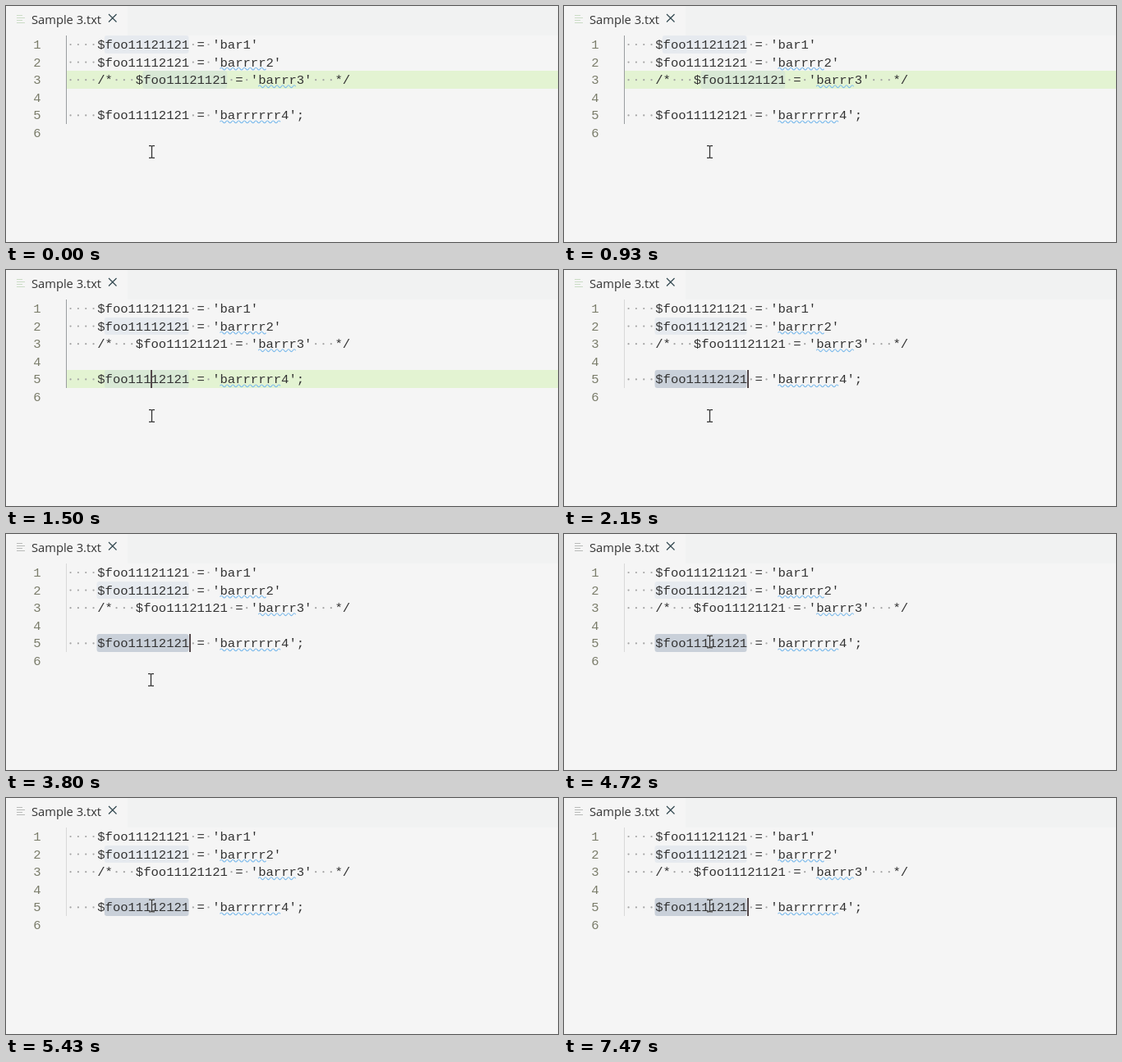
These frames come from a looping animation (672 by 288 pixels, 7.55 s). An HTML page:

```html
<!DOCTYPE html>
<html lang="en">
<head>
<meta charset="utf-8">
<title>Editor selection</title>
<style>
  html, body { margin: 0; height: 100%; overflow: hidden; background: #f5f5f5; }
  svg { display: block; width: 672px; height: 288px; }
  .code { font: 15.55px "Liberation Mono", "Noto Sans Mono", monospace; fill: #333; }
  .number { fill: #7b7d6b; text-anchor: end; }
  .title { font: 14.7px "Open Sans", "Noto Sans", sans-serif; fill: #333; }
  .dot { fill: #a4a4a4; }
  .wave { fill: none; stroke: #7fbcec; stroke-width: 1.1; }
  .soft { fill: rgba(185, 197, 218, .25); }
  .picked { fill: #c9d0d9; }
  .halo { fill: none; stroke: #fff; stroke-width: 2.2; opacity: .6; }
  .beam { fill: none; stroke: #303030; stroke-width: 1.3; }
</style>
</head>
<body>
<svg viewBox="0 0 672 288">
  <rect width="672" height="288" fill="#f5f5f5"/>
  <rect x="148" width="524" height="36" fill="#f1f2f2"/>
  <path id="icon" d="M13 11.5h7M13 14.5h10M13 17.5h7M13 20.5h10" stroke-width="1.2"/>
  <text class="title" x="31" y="22">Sample 3.txt</text>
  <path d="M125 10l9.5 9.5M134.5 10l-9.5 9.5" stroke="#31474f" stroke-width="1.2"/>
  <rect id="active" x="73" width="599" fill="#e3f3d2"/>
  <g id="marks"></g>
  <rect id="guide" x="73" y="36" width="1" height="108"/>
  <g id="text"></g>
  <rect id="caret" width="2" fill="#54494b"/>
  <g id="mouse"></g>
</svg>
<script>
const LOOP = 7550, BLINK = 515;
const LEFT = 73.9, CELL = 9.33, TOP = 36, PITCH = 21.6;
const lines = [
  "    $foo11121121 = 'bar1'",
  "    $foo11112121 = 'barrrr2'",
  "    /*   $foo11121121 = 'barrr3'   */",
  "",
  "    $foo11112121 = 'barrrrrr4';",
  ""
];

// The caret is lit at `lit` and toggles from there; `word` marks each of its occurrences.
const scenes = [
  { from: 0, row: 2, col: 11, lit: 400, word: "foo11121121" },
  { from: 1100, row: 3, col: 0 },
  { from: 1270, row: 4, col: 11 },
  { from: 1500, row: 4, col: 11, lit: 1270, word: "foo11112121" },
  { from: 2150, row: 4, col: 16, word: "$foo11112121", selected: true },
  { from: 3240, row: 4, col: 16, lit: 3800, word: "$foo11112121", selected: true },
  { from: 4780, row: 4, col: 11 },
  { from: 4950, row: 4, col: 16, lit: 4915, word: "foo11112121", selected: true, alone: true },
  { from: 5030, row: 4, col: 16, lit: 4915, word: "foo11112121", selected: true },
  { from: 6440, row: 4, col: 16, word: "$foo11112121", selected: true }
];

const $ = id => document.getElementById(id);
const colX = col => LEFT + col * CELL;
const rowBox = row => {
  const y = Math.round(TOP + row * PITCH);
  return { y, height: Math.round(TOP + (row + 1) * PITCH) - y };
};

function set(node, attrs) {
  for (const name in attrs) node.setAttribute(name, attrs[name]);
}

function add(parent, tag, attrs, content = "") {
  const node = document.createElementNS("http://www.w3.org/2000/svg", tag);
  set(node, attrs);
  node.textContent = content;
  return parent.appendChild(node);
}

function show(node, visible) {
  node.style.visibility = visible ? "visible" : "hidden";
}

function drawText() {
  const text = $("text");
  lines.forEach((line, row) => {
    const baseline = TOP + row * PITCH + 16;
    add(text, "text", { class: "code number", x: 42.5, y: baseline }, row + 1);
    for (const { 0: word, index } of line.matchAll(/\S+/g))
      add(text, "text", { class: "code", x: colX(index), y: baseline }, word);
    for (const { index } of line.matchAll(/ /g))
      add(text, "circle", { class: "dot", cx: colX(index + 0.5), cy: baseline - 5, r: 1.1 });
    for (const { 0: typo, index } of line.matchAll(/barr+/g)) {
      const half = 3.5, count = Math.round(typo.length * CELL / half);
      const d = `M${colX(index)} ${baseline + 3}q${half / 2}-2.8 ${half} 0` + `t${half} 0`.repeat(count - 1);
      add(text, "path", { class: "wave", d });
    }
  });
}

function drawMouse() {
  const half = "M-3.5-7.4H-1.2Q0-7.4 0-6.2Q0-7.4 1.2-7.4H3.5";
  const d = half + "M0-6.4V6.4M-3.5 7.4H-1.2Q0 7.4 0 6.2Q0 7.4 1.2 7.4H3.5";
  for (const kind of ["halo", "beam"]) add($("mouse"), "path", { class: kind, d });
}

function drawMarks({ row, word, selected, alone }) {
  $("marks").replaceChildren();
  if (!word) return;
  lines.forEach((line, i) => {
    const start = line.indexOf(word), own = i === row;
    if (start < 0 || (alone && !own)) return;
    add($("marks"), "rect", {
      class: selected && own ? "picked" : "soft",
      x: colX(start) - 0.7, width: word.length * CELL, rx: 3, ...rowBox(i)
    });
  });
}

function drawScene(scene) {
  const { row, col, selected } = scene;
  drawMarks(scene);
  show($("active"), !selected);
  set($("active"), rowBox(row));
  set($("guide"), { fill: selected ? "#d8d8d8" : "#9a9ea0" });
  set($("caret"), { x: Math.floor(colX(col)), ...rowBox(row) });
}

// Eased progress from 0 to 1 between two times
function ease(t, from, to) {
  const p = Math.min(1, Math.max(0, (t - from) / (to - from)));
  return 1 - (1 - p) ** 2;
}

let current;
function draw(t) {
  const scene = scenes.findLast(({ from }) => from <= t);
  if (scene !== current) drawScene(current = scene);

  const { from, lit = from } = scene;
  show($("caret"), Math.floor((t - lit) / BLINK) % 2 === 0);

  const moved = t >= 3090;
  const x = 177.5 - moved + ease(t, 4190, 4260);
  const y = 178 - 52 * ease(t, 3990, 4260) + 5.5 * ease(t, 4600, 4720);
  set($("mouse"), { transform: `translate(${x} ${y})` });
  set($("icon"), { stroke: moved ? "#b9bbb9" : "#cbdcc6" });
}

drawText();
drawMouse();
const start = performance.now();
function tick() {
  draw((performance.now() - start) % LOOP);
  requestAnimationFrame(tick);
}
tick();
</script>
</body>
</html>
```
